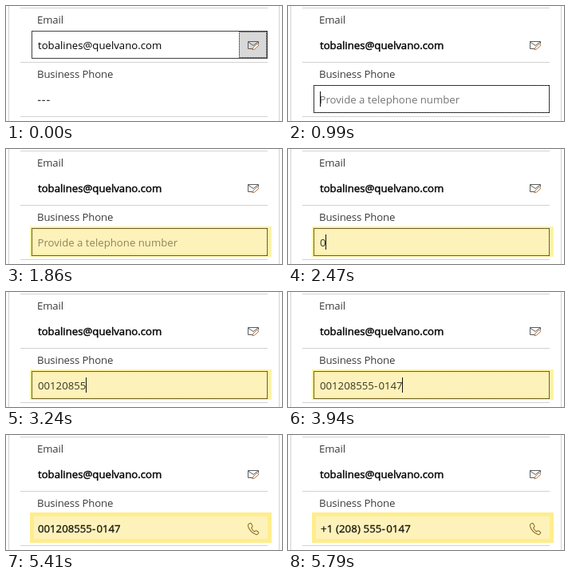
These frames come from a looping animation (346x144 px, 8740 ms). An HTML page:

```html
<!DOCTYPE html>
<html lang="en">
<head>
<meta charset="utf-8">
<title>Phone field</title>
<style>
  html, body { margin: 0; width: 100%; height: 100%; overflow: hidden; background: #fff; }
  svg { display: block; width: 346px; height: 144px; }
  text { font: 13.2px "Open Sans", "Noto Sans", sans-serif; white-space: pre; }
  .label { fill: #3a3a3a; letter-spacing: -.15px; }
  .dash { letter-spacing: 1.35px; }
  .strong { stroke: #000; stroke-width: .45px; }
  .rule { stroke: #d2d2d2; fill: none; }
  .dots { stroke-dasharray: 1 1; fill: none; }
  .icon { fill: none; stroke-linecap: round; stroke-linejoin: round; }
</style>
</head>
<body>
<svg viewBox="0 0 346 144">
  <rect width="346" height="144" fill="#fff"/>
  <path class="rule" d="M3.5 0V144M342.5 0V144M18 2.5H328M18 70.5H328M18 138.5H328"/>
  <text class="label" x="39" y="22">Email</text>
  <text class="label" x="39" y="90">Business Phone</text>

  <g id="emailBox">
    <rect x="32.5" y="31.5" width="295" height="34" fill="#fff" stroke="#444"/>
    <rect x="292" y="32" width="35" height="33" fill="#d8d8d8"/>
    <path class="dots" stroke="#111" d="M292 32.5H327M292 64.5H327M292.5 32V65M326.5 32V65"/>
  </g>
  <text id="email" x="40" y="54" fill="#000">tobalines@quelvano.com</text>
  <g class="icon" stroke="#5c5c5c">
    <path d="M308.5 53.5H303.5V44.5H316.5V47M303.5 45L310 49.5L316 45"/>
    <path d="M309 54.5L310 51.8L315 47.4L317 49.2L312 53.7Z" fill="#fff" stroke="#a8794c"/>
  </g>

  <g id="glow">
    <rect x="30" y="97" width="303" height="38" fill="#fff4b0"/>
    <rect id="ring" x="32.5" y="99.5" width="298" height="33" fill="#fef2bb" stroke="#ffed8c" stroke-width="5"/>
  </g>
  <g id="focus" fill="none">
    <rect id="border" x="32.5" y="99.5" width="295" height="34"/>
    <path id="dots" class="dots" d="M32 99.5H328M32 133.5H328M32.5 99V134M327.5 99V134"/>
  </g>
  <text id="empty" class="dash" x="39.5" y="122" fill="#333" stroke="#333" stroke-width=".3">---</text>
  <text id="hint" x="39.5" y="122">Provide a telephone number</text>
  <text id="phone" y="122"><tspan id="head"></tspan><tspan id="dash" class="dash"></tspan><tspan id="tail"></tspan></text>
  <rect id="caret" y="107" width="1" height="19" fill="#111"/>
  <path id="call" class="icon" stroke="#93752f" stroke-width="1.1"
    d="M304.5 111.2L306.3 110.4Q307 110.2 307.4 110.9L309 114Q309.3 114.7 308.7 115.2L307.6 116.2Q308.8 119.2 311.6 121L313 120Q313.6 119.6 314.2 120L316.5 121.8Q317 122.3 316.6 122.9L315.4 124.2Q314.6 124.9 313.2 124.4Q305.8 121.5 303.5 114.5Q303 112.2 304.5 111.2Z"/>
</svg>
<script>
  const LOOP = 8740;
  const RAW = "001208555-0147";
  const FORMATTED = "+1 (208) 555-0147";
  const KEYS = [2470, 2550, 2700, 2780, 2930, 3010, 3090, 3240, 3310, 3480, 3630, 3710, 3790, 3940];
  const FOCUS = 990, GLOW = 1860, BLUR = 5410, FORMAT = 5790;
  const $ = id => document.getElementById(id);
  const show = (id, on) => $(id).setAttribute("visibility", on ? "visible" : "hidden");
  const within = (t, from, to) => t >= from && t < to;

  function setPhone(text) {
    const [head, tail] = text.split("-");
    $("head").textContent = head;
    $("dash").textContent = tail === undefined ? "" : "-";
    $("tail").textContent = tail || "";
  }

  function caretX(text) {
    const advance = [...text].reduce((sum, c) => sum + (c === "-" ? 5.6 : 7.55), 0);
    return 40 + Math.floor(advance);
  }

  function draw(t) {
    const typed = RAW.slice(0, KEYS.filter(k => k <= t).length);
    const focused = within(t, FOCUS, BLUR);
    const done = t >= BLUR;
    const formatted = t >= FORMAT;
    const glowing = t >= GLOW;
    const caretOff = within(t, 1540, 2010) || within(t, 4490, 4950);

    show("emailBox", t < FOCUS);
    $("email").setAttribute("class", t < FOCUS ? "" : "strong");
    show("empty", t < FOCUS);
    show("focus", focused);
    $("border").setAttribute("stroke", glowing ? "#8a7e45" : "#666");
    $("dots").setAttribute("stroke", glowing ? "#4a4218" : "#000");
    show("glow", glowing);
    $("ring").setAttribute("stroke-opacity", done ? 1 : .35);
    show("hint", focused && !typed);
    $("hint").setAttribute("fill", glowing ? "#8f8556" : "#757575");

    setPhone(formatted ? FORMATTED : typed);
    $("phone").setAttribute("x", formatted ? 41 : 40);
    const style = $("phone").style;
    style.fill = done ? "#1c1a10" : "#3a3621";
    style.stroke = done ? "#1c1a10" : "none";
    style.strokeWidth = ".35px";
    style.letterSpacing = formatted ? ".13px" : "0";

    show("caret", focused && !caretOff);
    $("caret").setAttribute("x", caretX(typed));
    show("call", done);
  }

  function tick() {
    draw(performance.now() % LOOP);
    requestAnimationFrame(tick);
  }
  tick();
</script>
</body>
</html>
```
